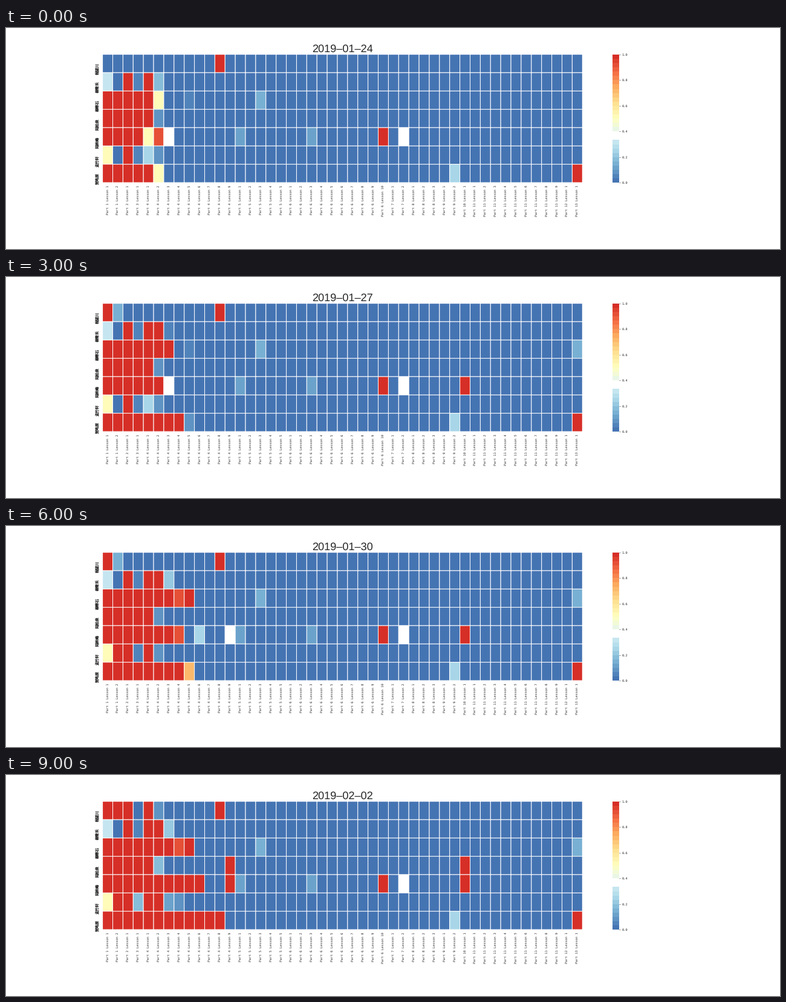
A matplotlib script for the animation above (10 s loop, 1280 px wide and 366 px high).

```python
import numpy as np
import matplotlib.pyplot as plt
from matplotlib.animation import FuncAnimation
from matplotlib.colors import ListedColormap

W, H, DPI = 1280, 366, 100
PT = 72 / DPI  # points per pixel
DAYS = 10
LEVELS = 30
INK = "#262626"

plt.rcParams.update({"font.family": "DejaVu Sans Mono",
                     "text.hinting": "none",
                     "text.color": INK,
                     "xtick.color": INK,
                     "ytick.color": INK})

LESSONS_PER_PART = [2, 1, 1, 9, 5, 10, 2, 3, 2, 1, 9, 1, 1]
LESSONS = [f"Part {p} Lesson {n}"
           for p, count in enumerate(LESSONS_PER_PART, 1)
           for n in range(1, count + 1)]

# Lessons completed by each learner, as {day: total}; the fraction is the
# share of the lesson in hand.
PACE = {
    "程望川": {0: 0, 3: 1.15, 9: 5.09},
    "柳青禾": {0: 5.17, 2: 6.05, 6: 6.21},
    "柳寒石": {0: 5.5, 1: 7, 5: 7.92, 6: 9},
    "陆柏泉": {0: 5.09, 9: 5.17},
    "陆映峰": {0: 4.5, 1: 6, 5: 6.64, 6: 7.92, 8: 10},
    "孟竹轩": {0: .5, 5: 5.09, 7: 6.05, 9: 6.11},
    "贺鸣原": {0: 5.5, 1: 6, 2: 6.46, 3: 8.09, 4: 8.21,
            5: 8.64, 6: 8.71, 8: 9.25, 9: 12},
}
PEOPLE = list(PACE)

# Lessons opened out of order: (day, person, share, lessons).
AHEAD = [
    (0, 0, 1, [11]), (0, 2, .05, [8]), (0, 2, .15, [15]),
    (0, 4, .92, [5]), (0, 4, .37, [6, 29]), (0, 4, .11, [13, 20]),
    (0, 4, 1, [27]), (0, 5, 1, [2]), (0, 5, .25, [4]), (0, 5, .09, [5]),
    (0, 6, .25, [34]), (0, 6, 1, [46]),
    (1, 2, .15, [46]), (1, 4, 1, [35]),
    (5, 2, .25, [8]), (5, 4, .25, [9]), (5, 4, .37, [12]),
    (7, 4, .25, [8]), (8, 3, 1, [12, 35]), (8, 4, 1, [12]),
    (9, 5, .08, [7]),
]

# Lessons left unfinished on the way, in the same form.
SKIPPED = [
    (0, 1, .3, [0]), (0, 1, 0, [1]), (0, 1, .05, [3]),
    (0, 5, .5, [0]), (0, 5, .05, [3]), (7, 5, .17, [3]),
    (5, 2, .92, [7]), (9, 0, 0, [3]),
]


def mark(grid, entries, day):
    for start, person, share, lessons in entries:
        if start <= day:
            grid[person, lessons] = share


def progress(day):
    grid = np.zeros((len(PEOPLE), len(LESSONS)))
    mark(grid, AHEAD, day)
    for row, pace in zip(grid, PACE.values()):
        total = pace[max(d for d in pace if d <= day)]
        done = int(total)
        row[:done] = 1
        if total > done:
            row[done] = total - done
    mark(grid, SKIPPED, day)
    return grid


def make_cmap():
    colors = plt.get_cmap("RdYlBu_r")(np.linspace(.1, .9, LEVELS))
    colors[LEVELS // 3:LEVELS * 2 // 5] = 1  # blank band
    return ListedColormap(colors)


def date_text(day):
    date = str(np.datetime64("2019-01-24") + day)
    return date.replace("-", "\u2013")


def add_axes(x, y, w, h):
    """Frameless axes, placed in pixels from the top left."""
    ax = fig.add_axes([x / W, 1 - (y + h) / H, w / W, h / H])
    for spine in ax.spines.values():
        spine.set_visible(False)
    return ax


cmap = make_cmap()
fig = plt.figure(figsize=(W / DPI, H / DPI), dpi=DPI, facecolor="white")

ax = add_axes(159.65, 43.7, 793.6, 212.3)
mesh = ax.pcolormesh(progress(0), cmap=cmap, vmin=0, vmax=1, snap=False,
                     antialiased=True, edgecolors="white", linewidth=PT)
ax.invert_yaxis()
ax.set_xticks(np.arange(len(LESSONS)) + .5, LESSONS, rotation=90)
ax.set_yticks(np.arange(len(PEOPLE)) + .5, PEOPLE, rotation=90,
              va="top", fontfamily="Noto Sans CJK JP")
ax.tick_params(axis="x", length=0, pad=4.5 * PT, labelsize=5.33 * PT)
ax.tick_params(axis="y", length=0, pad=3.7 * PT, labelsize=6.4 * PT)

cax = add_axes(1003.2, 43.9, 10.6, 212.3)
shares = (np.arange(LEVELS) + .5) / LEVELS
cax.pcolormesh([0, 1], np.linspace(0, 1, LEVELS + 1), shares[:, None],
               cmap=cmap, vmin=0, vmax=1)
cax.set_xticks([])
cax.yaxis.tick_right()
ticks = np.linspace(0, 1, 6)
cax.set_yticks(ticks, [f"{v:.1f}" for v in ticks])
cax.tick_params(axis="y", length=2.24 * PT, width=.55 * PT, pad=2.24 * PT,
                labelsize=5.33 * PT)

title = fig.text(556.8 / W, 1 - 40 / H, date_text(0), ha="center",
                 va="baseline", fontsize=18.2 * PT,
                 fontfamily="Liberation Sans")


def draw(day):
    mesh.set_array(progress(day))
    title.set_text(date_text(day))
    return mesh, title


anim = FuncAnimation(fig, draw, frames=DAYS, interval=1000,
                     repeat=True, repeat_delay=0)
plt.show()
```
